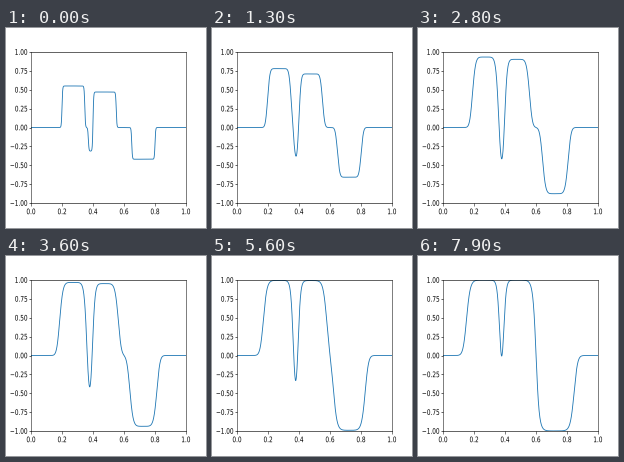
A matplotlib script for the animation above (8000 ms loop, 200 by 200 pixels).

```python
import numpy as np
import matplotlib.pyplot as plt
from matplotlib.animation import FuncAnimation
from matplotlib.patches import PathPatch
from matplotlib.textpath import TextPath
from matplotlib.transforms import Affine2D

SIZE = 200                   # stage side in pixels
PX = 0.72                    # one pixel in points at 100 dpi
FRAMES, INTERVAL = 80, 100
SQUEEZE = 3 / 4              # a 4:3 page shown on a square stage
FONT = 7.7
LEFT, RIGHT, BOTTOM, TOP = 25, 180, 25, 176

# Allen-Cahn equation, constants per frame
DIFFUSION, GROWTH = 4.8e-6, 0.049
SUBSTEPS = 20
PLATEAUS = [(0.20, 0.347, 0.55), (0.37, 0.40, -0.313),
            (0.40, 0.55, 0.47), (0.65, 0.80, -0.42)]
EDGE = 0.0042

x = np.linspace(0, 1, 1001)


def start():
    u = np.zeros_like(x)
    for a, b, level in PLATEAUS:
        u += level / 2 * (np.tanh((x - a) / EDGE) - np.tanh((x - b) / EDGE))
    return u


def advance(u):
    dt = 1 / SUBSTEPS
    spread = DIFFUSION * dt / (x[1] - x[0]) ** 2
    for _ in range(SUBSTEPS):
        p = np.pad(u, 1, mode="edge")
        u = u + spread * (p[2:] - 2 * u + p[:-2]) + GROWTH * dt * (u - u**3)
    return u


def solve():
    states = [start()]
    while len(states) < FRAMES:
        states.append(advance(states[-1]))
    return states


fig = plt.figure(figsize=(2, 2), dpi=100, facecolor="white")
ax = fig.add_axes([LEFT / SIZE, BOTTOM / SIZE,
                   (RIGHT - LEFT) / SIZE, (TOP - BOTTOM) / SIZE])
ax.set(xlim=(0, 1), ylim=(-1, 1),
       xticks=np.linspace(0, 1, 6), yticks=np.linspace(-1, 1, 9))
ax.tick_params(axis="x", length=2.7 * PX, width=0.5 * PX, labelbottom=False)
ax.tick_params(axis="y", length=2.0 * PX, width=0.6 * PX, labelleft=False)
for side, spine in ax.spines.items():
    spine.set_linewidth((0.5 if side in ("left", "right") else 0.6) * PX)


def label(text, px, py, anchor):
    """Place text at (px, py); anchor 0.5 centres it, 1 right-aligns it."""
    path = TextPath((0, 0), text, size=FONT, prop={"family": "DejaVu Sans"})
    box = path.get_extents()
    dx = box.x0 + anchor * box.width
    dy = 0.729 * FONT / 2
    place = (Affine2D().translate(-dx, -dy).scale(SQUEEZE, 1)
             .translate(px, py).scale(1 / SIZE))
    fig.add_artist(PathPatch(path, facecolor="black", linewidth=0,
                             transform=place + fig.transFigure))


for v in ax.get_xticks():
    label(f"{v:.1f}", LEFT + v * (RIGHT - LEFT), 16.6, 0.5)
for v in ax.get_yticks():
    label(f"{v:.2f}".replace("-", "\u2212"), 21.2,
          BOTTOM + (v + 1) / 2 * (TOP - BOTTOM), 1)

states = solve()
curve, = ax.plot(x, states[0], color="#1f77b4", linewidth=0.85 * PX)


def draw(i):
    curve.set_ydata(states[i])
    return curve,


anim = FuncAnimation(fig, draw, frames=FRAMES, interval=INTERVAL,
                     repeat=True, repeat_delay=0, blit=False)
plt.show()
```
